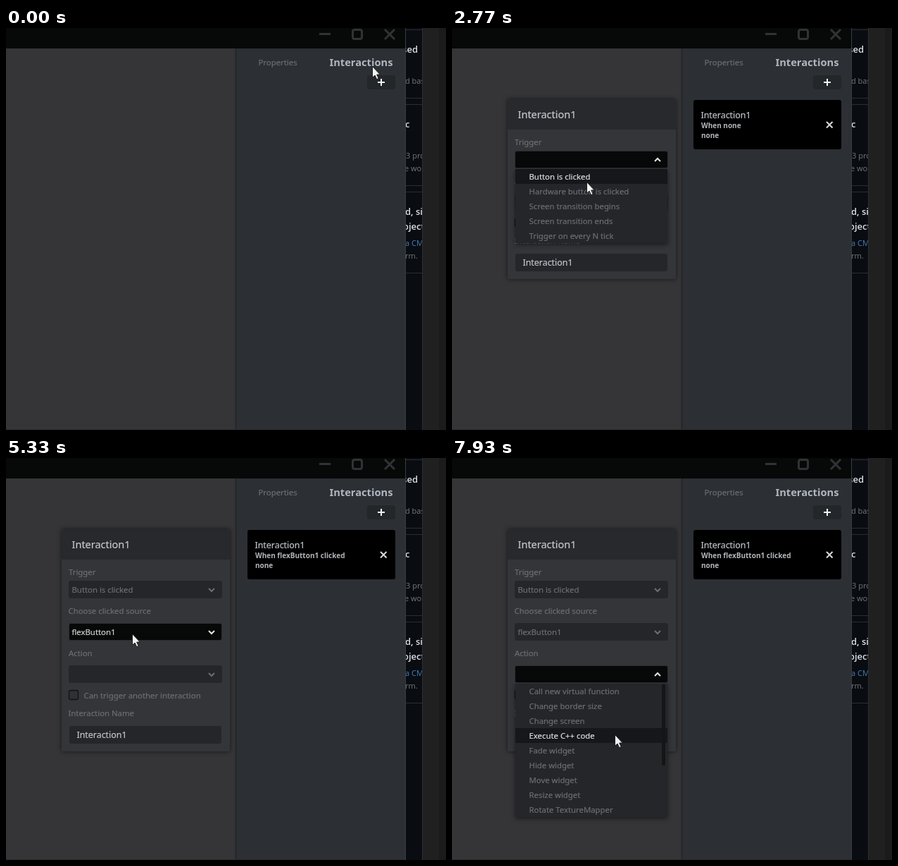
Animation, 625 px wide and 570 px high, one loop 8 s. Source, as an HTML page:

```html
<!DOCTYPE html>
<html lang="en">
<head>
<meta charset="utf-8">
<title>Adding an interaction</title>
<style>
  html, body { margin: 0; width: 100%; height: 100%; overflow: hidden; background: #1b1b1c; }
  svg { display: block; width: 625px; height: 570px; }
  text { font: 400 11.35px "Noto Sans", "Open Sans", sans-serif; fill: #6c6e71; stroke: #6c6e71; stroke-width: .2px; }
  .hidden { display: none; }
  .line { fill: none; stroke: #2a2e33; }
  .page text { font: 400 11px "Open Sans", sans-serif; fill: #75797f; stroke: none; }
  .page .bold { font-size: 13px; font-weight: 600; fill: #dde1e5; }
  .page .link { fill: #477fb5; }
  .icon { fill: none; stroke: #303335; stroke-width: 3; }
  .popup { filter: drop-shadow(0 0 3px #0009); }
  .menu { filter: drop-shadow(0 2px 3px #0008); }
  .tab { font-size: 14.67px; font-weight: 700; fill: #b0b6bf; stroke: none; }
  .title { font-size: 14.5px; fill: #c3c7cc; stroke: #c3c7cc; }
  .name { font-size: 12.4px; fill: #bfc3c8; stroke: #bfc3c8; }
  .small { font-size: 10px; font-weight: 700; fill: #b3b6ba; stroke: none; }
  .field rect { fill: #242629; stroke: #242629; }
  .field path { fill: none; stroke: #6c6e71; stroke-width: 2; }
  .field.lit rect { fill: #070808; stroke: #2b2d30; }
  .field.lit text { fill: #d0d2d4; stroke: #d0d2d4; }
  .field.lit path { stroke: #e4e5e6; }
  .row rect { fill: none; }
  .row.hover .back { fill: #15171a; }
  .row.hover text { fill: #dcdee0; stroke: #dcdee0; }
  .row.picked .back { fill: #0b0c0d; }
  .row.picked .mark { fill: #e6087e; }
</style>
</head>
<body>
<svg viewBox="0 0 625 570">
  <defs>
    <clipPath id="strip"><rect x="568" width="24" height="570"/></clipPath>
  </defs>

  <rect width="625" height="570" fill="#1b1b1c"/>
  <rect x="592" width="23" height="570" fill="#202020"/>
  <rect x="567" width="25" height="570" fill="#090c11"/>
  <g class="page" clip-path="url(#strip)">
    <path class="line" d="M567 2.5h25M567 99.5h25M567 108.5h25M567 223.5h25M567 232.5h25M567 347.5h25"/>
    <text class="bold" x="585" y="35" text-anchor="end">sed</text>
    <text x="567" y="79">d based</text>
    <text class="bold" x="567" y="141">c</text>
    <text x="568" y="185">3 project</text>
    <text x="566" y="203">e work</text>
    <text class="bold" x="567" y="265">d, simple</text>
    <text class="bold" x="564" y="286">ojects</text>
    <text class="link" x="567" y="309">a CMake</text>
    <text x="567" y="327">rm.</text>
  </g>
  <path class="line" d="M591.5 0V570"/>

  <rect width="567" height="570" fill="#353538"/>
  <rect x="327" y="29" width="240" height="541" fill="#2c2f33"/>
  <path d="M326.5 29V570" stroke="#242629" stroke-width="2"/>
  <path d="M567.5 0V570" stroke="#393d41"/>
  <path d="M0 569.5H567" stroke="#2a2a2c"/>
  <rect width="567" height="29" fill="#070908"/>
  <g class="icon">
    <path d="M445 8.5h16M538 2l14 14M552 2l-14 14"/>
    <rect x="492.5" y="2.5" width="13" height="13" rx="2.5"/>
  </g>

  <text x="358.5" y="53">Properties</text>
  <text class="tab" x="459.5" y="54">Interactions</text>
  <rect id="add" x="513" y="67" width="40" height="20" rx="3"/>
  <path d="M528 77h10M533 72v10" stroke="#f0f0f0" stroke-width="2"/>

  <g id="card">
    <rect x="343" y="102" width="210" height="70" rx="3"/>
    <text class="name" x="353.5" y="128">Interaction1</text>
    <text class="small" id="when" x="354" y="142"></text>
    <text class="small" x="354" y="156">none</text>
    <path d="M532 133l8.5 8.5M540.5 133l-8.5 8.5" stroke="#d8dadc" stroke-width="2"/>
  </g>

  <g id="popup">
    <g class="popup">
      <rect id="body" x="79" y="101" width="239" rx="2" fill="#333539"/>
      <rect x="79" y="101" width="239" height="43" rx="2" fill="#27292c"/>
    </g>
    <text class="title" x="93.5" y="128">Interaction1</text>
    <text x="89" y="166">Trigger</text>
    <g id="trigger" class="field"></g>
    <g id="sourceBlock">
      <text x="88.5" y="221">Choose clicked source</text>
      <g id="origin" class="field"></g>
    </g>
    <g id="lower">
      <text x="89" y="221">Action</text>
      <g id="action" class="field"></g>
      <rect x="89.5" y="269.5" width="13" height="13" rx="2.5" fill="#2e3033" stroke="#121314" stroke-width="1.3"/>
      <text x="110.5" y="281">Can trigger another interaction</text>
      <text x="88.5" y="306">Interaction Name</text>
      <rect x="90" y="320" width="216" height="25" rx="3" fill="#242629"/>
      <text class="name" x="100.5" y="337">Interaction1</text>
    </g>
  </g>

  <g id="triggerMenu" class="menu"></g>
  <g id="originMenu" class="menu"></g>
  <g id="actionMenu" class="menu"></g>

  <path id="cursor" d="M.5 .5V16.3L4 13l2.7 5.7 2.5-1.1L6.7 12h4.6Z" fill="#f2f2f2" stroke="#111" stroke-width=".9"/>
</svg>

<script>
const LOOP = 8000, TICK = 127, ROW = 21, FIELD = 26;
const CREATED = 1180, EXPANDED = 3650;
const el = id => document.getElementById(id);
const show = (id, on) => el(id).classList.toggle("hidden", !on);

// Pointer stops; the pointer rests until `glide` ticks before it arrives.
const stop = (tick, x, y, glide = 4) => ({ tick, x, y, glide });
const stops = [
  stop(0, 520, 54), stop(4, 495, 96), stop(8, 530, 81), stop(12, 489, 110, 3),
  stop(15, 181, 183), stop(17, 174, 192), stop(23, 207, 244), stop(25, 215, 216),
  stop(33, 176, 247), stop(37, 178, 262, 1), stop(42, 179, 249, 2), stop(44, 160, 314),
  stop(51, 102, 372, 3), stop(53, 199, 352), stop(57, 218, 357), stop(62, 231, 392)
];

function pointerAt(t) {
  const tick = Math.floor(t / TICK + .15);
  const i = stops.findIndex(s => s.tick > tick);
  if (i < 0) return stops.at(-1);
  const from = stops[i - 1], to = stops[i];
  const begin = Math.max(from.tick, to.tick - to.glide);
  const k = Math.max(0, (tick - begin) / (to.tick - begin));
  return { x: Math.round(from.x + (to.x - from.x) * k), y: Math.round(from.y + (to.y - from.y) * k) };
}

// Each select keeps the focus until the next one opens.
const selects = [
  { id: "trigger", y: 174, menuTop: 200, opens: 2340, picks: EXPANDED, value: "Button is clicked",
    items: ["Button is clicked", "Hardware button is clicked", "Screen transition begins",
      "Screen transition ends", "Trigger on every N tick"] },
  { id: "origin", y: 234, menuTop: 260, opens: 4560, picks: 5090, value: "flexButton1",
    items: ["flexButton1"] },
  { id: "action", y: 234, menuTop: 320, opens: 6130, picks: Infinity, value: "", scrolls: true,
    items: ["Call new virtual function", "Change border size", "Change screen", "Execute C++ code",
      "Fade widget", "Hide widget", "Move widget", "Resize widget", "Rotate TextureMapper"] }
];

for (const { id, y, menuTop, items, scrolls } of selects) {
  el(id).innerHTML = `<rect x="89.5" y="${y + .5}" width="217" height="24" rx="2.5"/>
    <text x="93.5" y="${y + 17}"></text><path/>`;
  const rows = items.map((item, i) => {
    const top = menuTop + i * ROW;
    return `<g class="row"><rect class="back" x="90" y="${top}" width="216" height="${ROW}"/>
      <rect class="mark" x="90" y="${top}" width="2" height="${ROW}"/>
      <text x="109.5" y="${top + 15}">${item}</text></g>`;
  });
  const bar = scrolls ? `<rect x="298" y="321" width="5" height="115" rx="2" fill="#131517"/>` : "";
  el(id + "Menu").innerHTML = `<rect x="90" y="${menuTop}" width="216"
    height="${items.length * ROW}" fill="#242629"/>${rows.join("")}${bar}`;
}

function drawSelect(s, next, t, pointer) {
  const open = t >= s.opens && t < s.picks + TICK;
  const focused = t >= s.opens && t < (next?.opens ?? LOOP);
  const depth = pointer.y - s.menuTop;
  const hovered = depth >= -FIELD && depth < 0;
  const field = el(s.id);
  field.classList.toggle("lit", focused || hovered);
  field.querySelector("text").textContent = t >= s.picks ? s.value : "";
  field.querySelector("path").setAttribute("d",
    open ? `M288 ${s.y + 15}l4 -4 4 4` : `M288 ${s.y + 11}l4 4 4 -4`);

  show(s.id + "Menu", open);
  const active = Math.floor(depth / ROW);
  el(s.id + "Menu").querySelectorAll(".row").forEach((row, i) => {
    row.classList.toggle("hover", i === active);
    row.classList.toggle("picked", i === active && t >= s.picks);
  });
}

function draw(t) {
  const pointer = pointerAt(t), expanded = t >= EXPANDED;
  const onAdd = pointer.x >= 513 && pointer.y >= 67 && pointer.y < 88;
  el("cursor").setAttribute("transform", `translate(${pointer.x} ${pointer.y})`);
  el("add").setAttribute("fill", onAdd ? "#070707" : "#24272a");
  show("card", t >= CREATED);
  show("popup", t >= CREATED);
  show("sourceBlock", expanded);
  el("when").textContent = expanded ? "When flexButton1 clicked" : "When none";
  el("body").setAttribute("height", expanded ? 315 : 255);
  el("lower").setAttribute("transform", `translate(0 ${expanded ? 60 : 0})`);
  selects.forEach((s, i) => drawSelect(s, selects[i + 1], t, pointer));
}

let start;
function play(now) {
  start ??= now;
  draw((now - start) % LOOP);
  requestAnimationFrame(play);
}
draw(0);
requestAnimationFrame(play);
</script>
</body>
</html>
```
